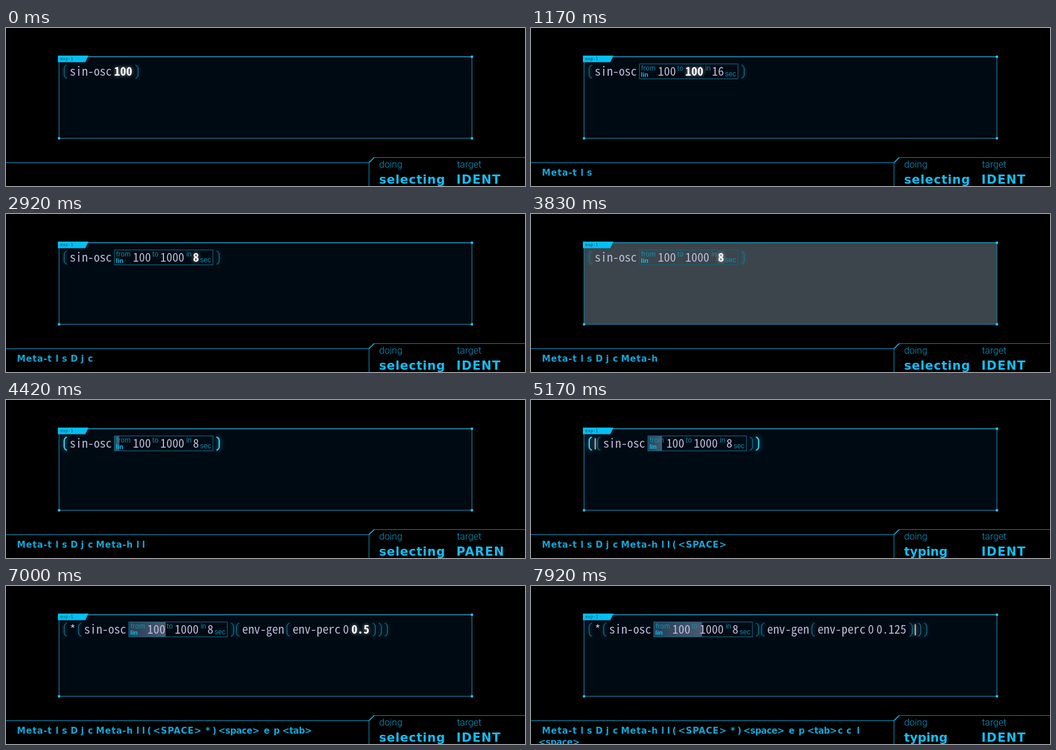
An HTML page with a canvas that plays this animation: 900x275 px, repeating every 8 s.

```html
<!DOCTYPE html>
<html>
<head>
<meta charset="utf-8">
<style>
html, body { margin: 0; width: 100%; height: 100%; background: #000; overflow: hidden; }
canvas { display: block; }
</style>
</head>
<body>
<canvas id="stage" width="900" height="275"></canvas>
<script>
const ctx = document.getElementById('stage').getContext('2d');
const LOOP = 8000, PLAY_AT = 4010, FLASH_AT = 3670;
const CELL = 10.4, GAP = 4.2, BASE = 83;
const MONO = '"Noto Sans Mono CJK JP", "Noto Sans CJK JP", "Noto Sans Mono", monospace';
const WIDE = '"DejaVu Sans", sans-serif';
const SMALL = '"Liberation Sans", sans-serif';

// Expression markup: "!" selected, "|" caret, "[ ]" highlighted parens, "@a,b,c" ramp
const osc = ramp => `sin-osc @${ramp}`;
const done = `( ${osc('100,1000,8')} )`;
const env = value => `( * ${done} ( env-gen ( env-perc 0 ${value} ) ) )`;

// time, key, key x, expression, mode, target
const steps = [
  [0, '', 0, '( sin-osc !100 )', 'selecting', 'IDENT'],
  [500, 'Meta-t', 19, `( ${osc('100,100,16')} )`, 'selecting', 'PAREN'],
  [750, 'l', 86, `( ${osc('!100,100,16')} )`, 'selecting', 'IDENT'],
  [1000, 's', 97, `( ${osc('100,!100,16')} )`, 'selecting', 'IDENT'],
  [2000, 'D', 112, `( ${osc('100,!1000,16')} )`, 'selecting', 'IDENT'],
  [2250, 'j', 130, `( ${osc('100,1000,!16')} )`, 'selecting', 'IDENT'],
  [2670, 'c', 142, `( ${osc('100,1000,!8')} )`, 'selecting', 'IDENT'],
  [3670, 'Meta-h', 156, `( ${osc('100,1000,!8')} )`, 'selecting', 'IDENT'],
  [4170, 'l', 226, `( ${osc('100,1000,8')} )`, 'selecting', 'PAREN'],
  [4420, 'l', 236, `[ ${osc('100,1000,8')} ]`, 'selecting', 'PAREN'],
  [4750, '(', 245, `[ ${done} ]`, 'selecting', 'PAREN'],
  [5000, '<SPACE>', 255, `[ | ${done} ]`, 'typing', 'IDENT'],
  [5330, '*', 346, `( !*| ${done} )`, 'typing', 'IDENT'],
  [5580, ')', 358, `( * [ ${osc('100,1000,8')} ] )`, 'selecting', 'PAREN'],
  [5830, '<space>', 368, `( * ${done} | )`, 'typing', 'IDENT'],
  [6000, 'e', 447, `( * ${done} !e| )`, 'typing', 'IDENT'],
  [6170, 'p', 464, `( * ${done} !ep| )`, 'typing', 'IDENT'],
  [6500, '<tab>', 479, env('!0.5'), 'selecting', 'IDENT'],
  [7170, 'c', 532, env('!0.25'), 'selecting', 'IDENT'],
  [7420, 'c', 547, env('!0.125'), 'selecting', 'IDENT'],
  [7580, 'l', 565, `( * ${done} ( env-gen [ env-perc 0 0.125 ] ) )`, 'selecting', 'PAREN'],
  [7830, '<space>', 13, `( * ${done} ( env-gen ( env-perc 0 0.125 ) | ) )`, 'typing', 'IDENT'],
];

function label(text, x, y, font, color, spacing = 0) {
  ctx.font = font;
  ctx.fillStyle = color;
  ctx.letterSpacing = spacing + 'px';
  ctx.fillText(text, x, y);
}

function glow(color, blur) {
  ctx.shadowColor = color;
  ctx.shadowBlur = blur;
}

function path(points, color, width = 1.2) {
  ctx.strokeStyle = color;
  ctx.lineWidth = width;
  ctx.beginPath();
  points.forEach(([x, y]) => ctx.lineTo(x, y));
  ctx.stroke();
}

function caret(x) {
  glow('rgba(190,215,225,.8)', 6);
  path([[x, 66.5], [x, 86]], '#c3d0d8', 1.8);
  glow('transparent', 0);
}

// Draws one monospaced word and returns its right edge
function word(token, x) {
  const selected = token.startsWith('!');
  const text = token.replace(/[!|]/g, '');
  const end = x + text.length * CELL;
  ctx.textAlign = 'center';
  if (selected) glow('rgba(255,255,255,.65)', 6);
  [...text].forEach((char, i) => label(char, x + (i + .5) * CELL, BASE,
    `${selected ? 'bold ' : ''}20.8px ${MONO}`, selected ? '#fff' : '#bdbddb'));
  glow('transparent', 0);
  ctx.textAlign = 'left';
  if (token.endsWith('|')) caret(end + (text ? .5 : .8));
  return end;
}

function paren(x, side, bright) {
  glow(bright ? '#00bfff' : 'rgba(0,170,215,.7)', bright ? 9 : 6);
  ctx.strokeStyle = bright ? '#49cbe6' : '#1c758c';
  ctx.lineWidth = bright ? 2.2 : 1.3;
  ctx.beginPath();
  ctx.moveTo(x + side * 5.5, 64.5);
  ctx.quadraticCurveTo(x + side * 1.2, 66, x + side * .7, 70.5);
  ctx.lineTo(x + side * .7, 81.5);
  ctx.quadraticCurveTo(x + side * 1.2, 86, x + side * 5.5, 87.5);
  ctx.stroke();
  glow('transparent', 0);
}

function ramp(token, x, time) {
  const [from, to, secs] = token.slice(1).split(',');
  const digits = token.replace(/[^0-9]/g, '').length;
  const width = 32.5 + 16.3 + 15 + 24.8 + digits * CELL;
  const teal = '#0d93b5';
  if (time > PLAY_AT) {
    const played = width * (time - PLAY_AT) / 8000;
    const fill = ctx.createLinearGradient(x, 0, x + played, 0);
    fill.addColorStop(0, '#263d55');
    fill.addColorStop(1, '#4c5a70');
    ctx.fillStyle = fill;
    ctx.fillRect(x, 62, played, 27);
  }
  ctx.strokeStyle = '#0d6580';
  ctx.lineWidth = 1.2;
  ctx.strokeRect(x + .5, 62.5, width - 1, 26);
  label('from', x + 3.5, 73.5, `12px ${SMALL}`, teal, .3);
  label('lin', x + 3, 84.5, `bold 11px ${SMALL}`, '#0cc3ef');
  let end = word(from, x + 32.5);
  label('to', end + 2.5, 73.5, `12px ${SMALL}`, teal, .4);
  end = word(to, end + 16.3);
  label('in', end + 3.5, 73.5, `12px ${SMALL}`, teal);
  end = word(secs, end + 15);
  label('sec', end + 2.2, 83.5, `12px ${SMALL}`, teal);
  return x + width;
}

function expression(source, time) {
  let x = 100.2, first = true;
  for (const token of source.split(' ')) {
    if (token === ')' || token === ']') {
      paren(x + 11, -1, token === ']');
      x += 10.5;
      continue;
    }
    if (!first) x += GAP;
    first = token === '(' || token === '[';
    if (first) {
      paren(x, 1, token === '[');
      x += 10.4;
    } else {
      x = token[0] === '@' ? ramp(token, x, time) : word(token, x);
    }
  }
}

function panel(time) {
  ctx.fillStyle = '#000a13';
  ctx.fillRect(92, 50, 716, 142);
  const age = time - FLASH_AT;
  if (age >= 0 && age < 400) {
    ctx.fillStyle = `rgba(248,252,255,${.4 * (1 - age / 400)})`;
    ctx.fillRect(92, 50, 716, 142);
  }
  ctx.strokeStyle = '#167595';
  ctx.lineWidth = 1.4;
  ctx.strokeRect(92, 50, 716, 142);
  path([[92, 50], [808, 50]], '#168bb0', 1.4);
  ctx.fillStyle = '#2bbce6';
  [[808, 50], [92, 192], [808, 192]].forEach(([x, y]) => ctx.fillRect(x - 2, y - 2, 4, 4));
  ctx.fillStyle = '#00bff5';
  ctx.beginPath();
  [[90, 48], [143, 48], [137.5, 59.5], [90, 59.5]].forEach(([x, y]) => ctx.lineTo(x, y));
  ctx.fill();
  label('exp-1', 94, 56, '7.5px "DejaVu Sans Mono", monospace', '#03465c');
}

function statusBar(time, mode, target) {
  const line = '#0889b0';
  path([[0, 234.3], [629.5, 234.3], [638.5, 225.5], [900, 225.5]], line);
  path([[629.5, 234.3], [629.5, 275]], line);
  path([[629.5, 234.3], [638.5, 225.5]], '#15b4e4', 1.6);
  label('doing', 647, 243, '300 16.5px Roboto, sans-serif', '#0c9ccb');
  label('target', 782, 243, '300 16.5px Roboto, sans-serif', '#0c9ccb');
  const bold = `bold 21px ${WIDE}`, cyan = '#12bdf2';
  label(mode, 647, 271, bold, cyan, mode === 'typing' ? -.1 : .8);
  label(target, 781, 271, bold, cyan, 1.2);
  steps.forEach(([at, key, x], i) => {
    if (at > time) return;
    const y = i === steps.length - 1 ? 277 : 257;
    label(key, x, y, `bold 15px ${WIDE}`, '#12a6d8', /<[a-z]/.test(key) ? -.4 : .9);
  });
}

function draw(now) {
  const time = now % LOOP;
  const [, , , source, mode, target] = steps.findLast(step => step[0] <= time);
  ctx.fillStyle = '#000';
  ctx.fillRect(0, 0, 900, 275);
  panel(time);
  expression(source, time);
  statusBar(time, mode, target);
  requestAnimationFrame(draw);
}
requestAnimationFrame(draw);
</script>
</body>
</html>
```
